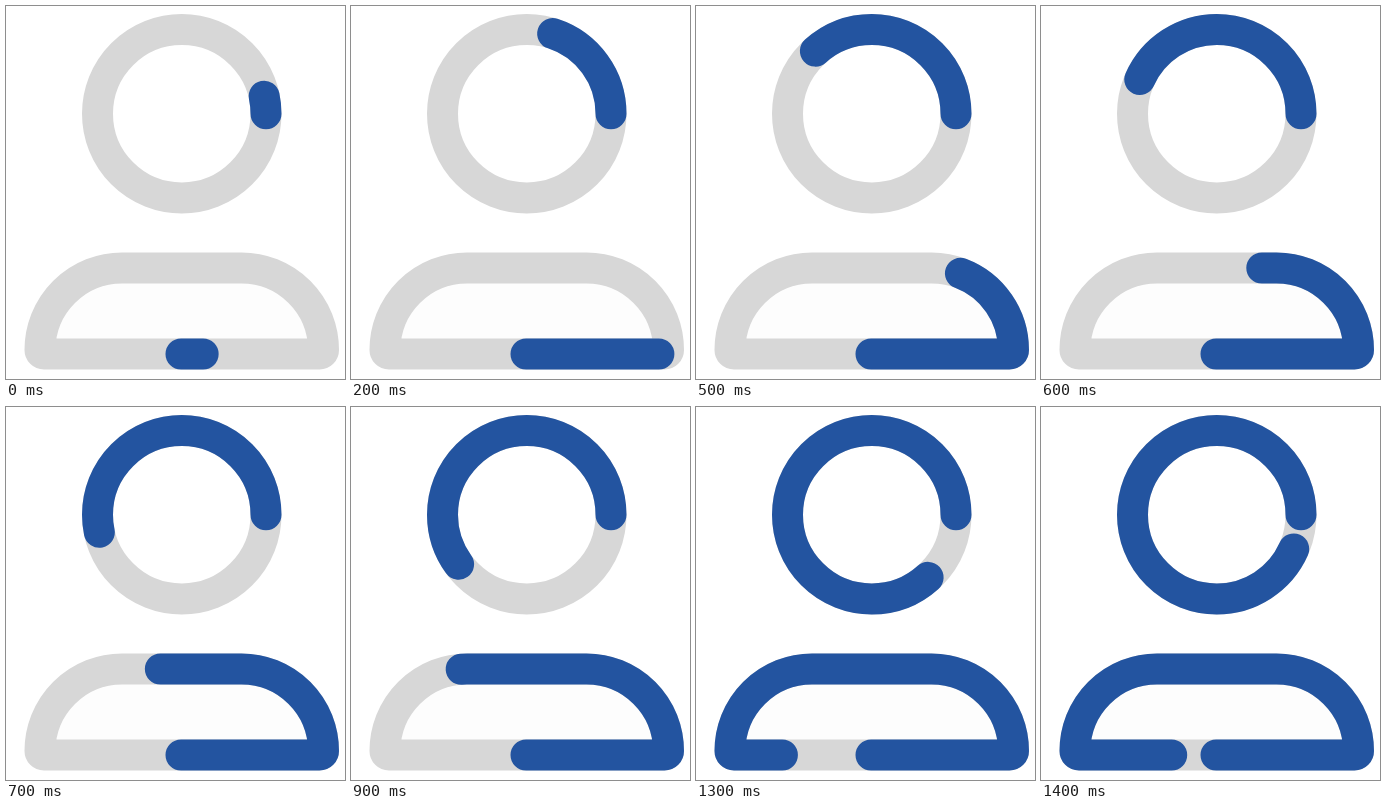
An HTML page that plays this animation: 339 px wide and 373 px high, repeating every 1500 ms.

```html
<!DOCTYPE html>
<html lang="en">
<head>
<meta charset="utf-8">
<title>User loader</title>
<style>
  html, body { margin: 0; width: 100%; height: 100%; overflow: hidden; background: #fff; }
  svg { display: block; width: 339px; height: 373px; }
  path { fill: none; stroke-width: 31; stroke-linejoin: round; }
  .track path { stroke: #d7d7d7; }
  .track .body { fill: #fdfdfd; }
  .fill path { stroke: #2354a0; stroke-linecap: round; }
</style>
</head>
<body>
<svg viewBox="0 0 339 373">
  <g class="track"></g>
  <g class="fill"></g>
</svg>
<script>
const LOOP = 1500, TICK = 100, PARTS = 30;
const STARTS = [0, 1, 2, 4, 5, 6, 7, 9, 10, 11, 13, 14]; // ticks at which the picture advances

const shapes = {
  head: 'M260 107.75a84.25 84.25 0 0 0 -168.5 0a84.25 84.25 0 0 0 168.5 0z',
  body: 'M175 348H313.5a4 4 0 0 0 4 -4a82 82 0 0 0 -82 -82H116a82 82 0 0 0 -82 82a4 4 0 0 0 4 4z'
};

function addPaths(group) {
  return Object.entries(shapes).map(([name, d]) => {
    const path = document.createElementNS('http://www.w3.org/2000/svg', 'path');
    path.setAttribute('class', name);
    path.setAttribute('d', d);
    path.setAttribute('pathLength', PARTS);
    return group.appendChild(path);
  });
}

addPaths(document.querySelector('.track'));
const strokes = addPaths(document.querySelector('.fill'));

function draw(time) {
  const tick = Math.floor((time % LOOP) / TICK);
  const step = STARTS.filter(s => s <= tick).length - 1;
  const drawn = Math.floor(step * PARTS / STARTS.length) + 1;
  for (const path of strokes) path.setAttribute('stroke-dasharray', `${drawn} ${PARTS * 2}`);
}

let start;
function loop(now) {
  start ??= now;
  draw(now - start);
  requestAnimationFrame(loop);
}

draw(0);
requestAnimationFrame(loop);
</script>
</body>
</html>
```
